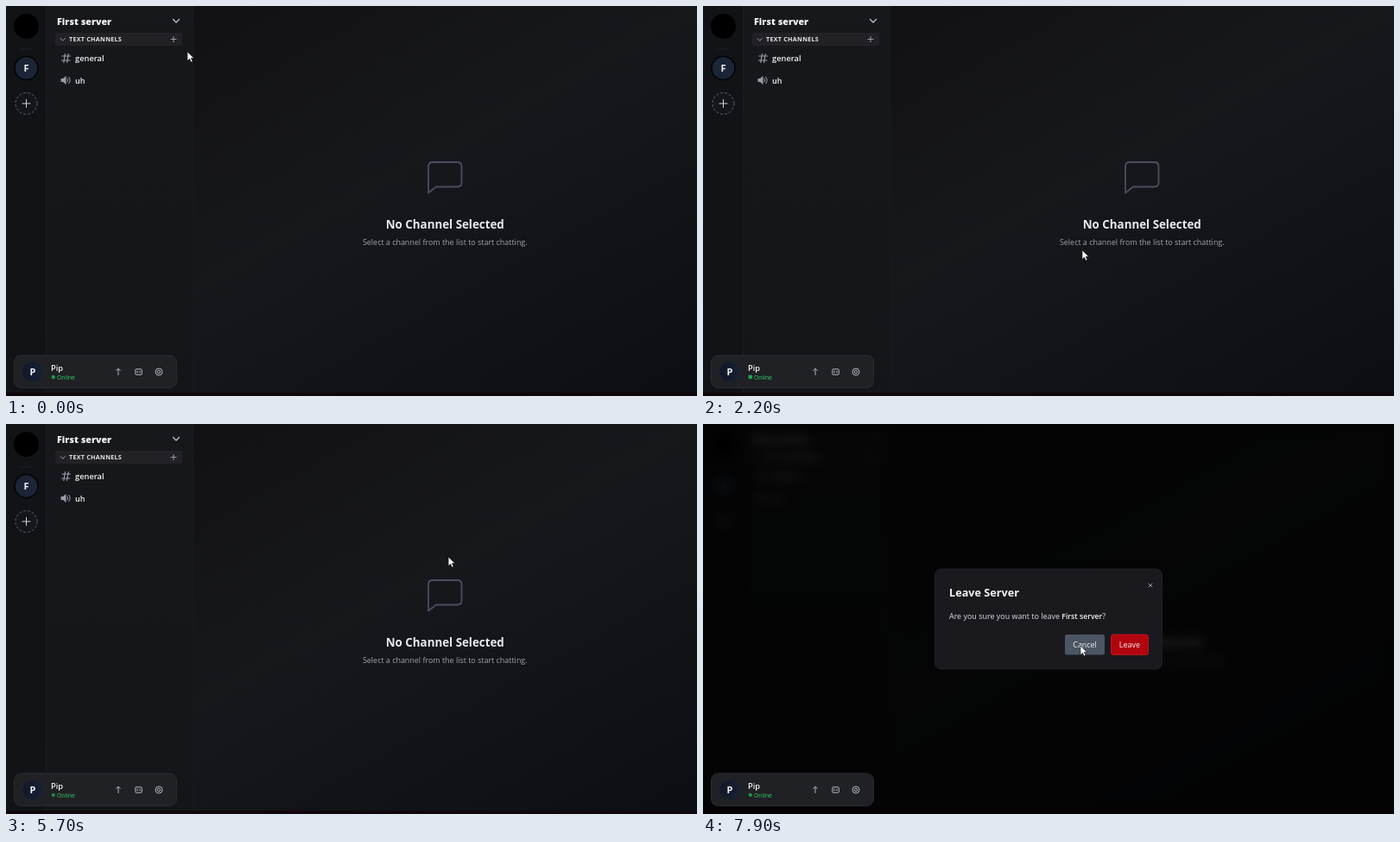
Animation, 800 px wide and 452 px high, one loop 8 s. Source, as an HTML page:

```html
<!DOCTYPE html>
<html lang="en">
<head>
<meta charset="utf-8">
<title>Server menu</title>
<style>
  html, body { margin: 0; width: 100%; height: 100%; overflow: hidden; background: #030304; }
  svg { display: block; width: 800px; height: 452px; font-family: "Open Sans", "Noto Sans", sans-serif; }
  .dim { filter: blur(6px) brightness(.2); }
  .line { fill: none; stroke-linecap: round; stroke-linejoin: round; }
</style>
</head>
<body>
<svg id="stage" viewBox="0 0 800 452"></svg>
<script>
const WHITE = '#f4f4f6', GREY = '#9a9ca6', SLATE = '#374151', HOVER = '#4b5563';
const stage = document.getElementById('stage');

// Text is placed by the vertical centre of its capitals.
const text = (x, cy, size, weight, fill, str, extra = '') =>
  `<text x="${x}" y="${cy + size * .36}" font-size="${size}" font-weight="${weight}" fill="${fill}" ${extra}>${str}</text>`;
const MID = 'text-anchor="middle"';
const box = (x, y, w, h, r, fill, extra = '') =>
  `<rect x="${x}" y="${y}" width="${w}" height="${h}" rx="${r}" fill="${fill}" ${extra}/>`;
const line = (d, stroke, width = 1, extra = '') =>
  `<path class="line" d="${d}" stroke="${stroke}" stroke-width="${width}" ${extra}/>`;
const disc = (x, y, r, fill, extra = '') =>
  `<circle cx="${x}" cy="${y}" r="${r}" fill="${fill}" ${extra}/>`;
const button = (x, y, w, h, fill, size, weight, label, extra = '') =>
  box(x, y, w, h, 2.5, fill, extra) + text(x + w / 2, y + h / 2, size, weight, WHITE, label, MID);
const avatar = (x, y, size) =>
  disc(x, y, 11.5, 'url(#avatar)') + text(x, y, size, 700, WHITE, 'P', MID);
const modal = (id, y, h, title, size, body) =>
  `<g id="${id}">` + box(268.5, y, 263, h, 7, '#19191e', 'stroke="#202026"') +
  text(285, y + 27.5, size, 700, WHITE, title) +
  line(`M516 ${y + 17}l4 4m0-4l-4 4`, '#a6a8b0', .9) + body + '</g>';

const rail = disc(23.5, 23.5, 14.5, '#000') +
  line('M17 50H30', '#1a2030') +
  disc(23.5, 72, 13.5, '#1c2536', 'stroke="#030408" stroke-width="1.5"') +
  text(23.5, 72, 11.2, 700, WHITE, 'F', MID) +
  disc(23.5, 113, 12.5, '#15161a', 'stroke="#5d606a" stroke-dasharray="3 2"') +
  line('M19 113h9M23.5 108.5v9', '#d0d2d8');

const channels = text(59, 18.2, 10.7, 800, WHITE, 'First server') +
  box(190, 10, 14, 14, 2, '#25262c', 'id="hover"') +
  '<g id="chevron">' + line('M193.5 15.5L197 19l3.5-3.5', '#c4c6cc', 1.2) + '</g>' +
  box(57, 31, 147, 15, 2, '#212126') +
  line('M63 37.5l2.7 2.7 2.7-2.7', GREY) +
  text(73, 38.5, 7.2, 700, '#e6e6ea', 'TEXT CHANNELS', 'letter-spacing=".25"') +
  line('M191 38.5h6M194 35.5v6', GREY) +
  line('M65 58h9.5M64.5 63h9.5M68.5 55.5l-1.7 10M72.3 55.5l-1.7 10', GREY, 1.2) +
  text(80, 60.5, 9.3, 600, WHITE, 'general') +
  `<path d="M63.5 84h2.500l3.500-3v10l-3.500-3h-2.500z" fill="${GREY}"/>` +
  line('M71 84q1.6 2 0 4M72.700 82.300q3.200 3.700 0 7.400', GREY) +
  text(80, 86.5, 9, 600, WHITE, 'uh');

const empty = line('M489 216.500V186q0-5 5-5H522.500q5 0 5 5V204.500q0 5-5 5H498z', '#4b4d5f', 1.8) +
  text(508.3, 253, 13.35, 700, '#e8e9ee', 'No Channel Selected', MID) +
  text(508.3, 273.3, 8.95, 400, '#a0a2ad', 'Select a channel from the list to start chatting.', MID);

const menu = '<g id="menu">' + box(100, 30, 104, 96.5, 2, '#1f1f27') +
  text(110, 42.7, 9, 600, WHITE, 'Server Settings') +
  text(110.5, 67, 9, 600, WHITE, '+ Create Category') +
  disc(114, 89, 1.5, WHITE) + disc(117.3, 89, 1.3, WHITE) +
  `<path d="M111 94q0-3 3-3t3 3zM117.500 94q0-2-.8-2.800 2.800-.3 2.800 2.800z" fill="${WHITE}"/>` +
  text(129, 91, 9, 600, '#3bd16f', 'Invite') +
  line('M112 117.500h7M113 117v-6h2.200v6M115.200 111.500h2.600v6', WHITE) +
  text(129, 114.7, 9, 600, '#f0435f', 'Leave Server') + '</g>';

const panel = '<g id="panel">' + box(9.5, 405, 188, 37.5, 8, '#202125', 'stroke="#2a2b30"') +
  avatar(31, 424, 11) + text(52, 419.7, 9.3, 600, WHITE, 'Pip') +
  disc(54.8, 430, 2.5, '#22c55e', 'id="status"') +
  text(59, 430.3, 6.8, 400, '#2fd268', 'Online') +
  line('M130 427.500v-7M127.700 422.500l2.300-2.300 2.300 2.300', '#b4b6be') +
  box(149.8, 420.8, 7.5, 6.5, 1, 'none', 'stroke="#b4b6be"') +
  line('M152 423v2M155 423v2', '#b4b6be') +
  disc(177, 424, 4, 'none', 'stroke="#b4b6be"') + disc(177, 424, 1.7, 'none', 'stroke="#b4b6be"') + '</g>';

const category = modal('category', 148.5, 155, 'Create Category', 12.8,
  text(285, 203.3, 9, 600, WHITE, 'Category Name') +
  box(285, 215, 230, 24.5, 3, '#222228') +
  text(293, 227.5, 8.9, 400, '#92949d', 'Enter category name') +
  text(285, 247, 6.7, 400, '#7d7f89', '0/20') +
  button(416, 263, 46, 24, SLATE, 8.9, 400, 'Cancel', 'class="cancel"') +
  button(469, 263, 46, 24, '#441dd3', 8.9, 400, 'Create'));

const invite = modal('invite', 132.5, 187, 'Invite Friends', 12.5,
  box(285.5, 180, 229.5, 39, 4, '#212127') + avatar(307, 199.7, 9) +
  text(326, 200, 9.2, 600, WHITE, 'palefern') +
  button(465, 191, 40, 17, '#10bb40', 7.7, 600, 'Invite') +
  box(285.5, 233.5, 229.5, 68.5, 4, '#212127') +
  text(295, 248.5, 7.73, 600, '#e4e5ea', 'Or, Send A Server Invite Link To A Friend') +
  box(295, 260, 167.5, 21, 2.5, '#17171c') +
  text(302.5, 270.5, 7.9, 400, WHITE, 'https://xelyra.gg/invite/f921a270-e233-49') +
  button(466.5, 260, 39.5, 21, '#4d25e6', 8.2, 600, 'Copy') +
  text(295, 289, 6.62, 400, '#9698a4', 'Your invite link expires in 7 days.'));

const leave = modal('leave', 168, 116, 'Leave Server', 12.7,
  text(285, 223, 8.95, 400, '#dcdde2',
    `Are you sure you want to leave <tspan font-weight="600" font-size="8.7" fill="${WHITE}">First server</tspan>?`) +
  button(419, 244, 46, 23.5, SLATE, 8.9, 400, 'Cancel', 'class="cancel"') +
  button(472.5, 244, 43, 23.5, '#b2040e', 9, 400, 'Leave', 'stroke="#cf1722" stroke-width=".8"'));

stage.innerHTML = `<defs>
  <linearGradient id="main" x1="0" y1="0" x2="1" y2="1">
    <stop stop-color="#0f0f10"/><stop offset=".5" stop-color="#17181c"/><stop offset="1" stop-color="#0d0e13"/>
  </linearGradient>
  <linearGradient id="side" x2="0" y2="1">
    <stop stop-color="#17181c"/><stop offset="1" stop-color="#141519"/>
  </linearGradient>
  <linearGradient id="avatar"><stop stop-color="#111827"/><stop offset="1" stop-color="#172036"/></linearGradient>
</defs>
<g id="app">` +
  box(0, 0, 800, 448, 0, 'url(#main)') + box(0, 0, 47, 448, 0, '#121317') +
  box(47, 0, 170, 448, 0, 'url(#side)') +
  line('M46.5 0V448', '#1d1e22') + line('M217 0V448', '#191a1e') +
  rail + channels + empty + menu + '</g>' +
  panel + category + invite + leave + box(0, 448, 800, 4, 0, '', 'id="edge"') +
  `<path id="cursor" d="M0 0v10.500l2.500-2.300 1.700 3.800 1.800-.8-1.700-3.700h3.300z" fill="#fff" stroke="#111" stroke-width=".6"/>`;

const $ = id => document.getElementById(id);
const show = (id, on) => $(id).style.display = on ? '' : 'none';
const cancels = [...document.querySelectorAll('.cancel')];

// Pointer stops: time, x, y
const stops = [
  [0, 210, 53], [300, 197, 18], [600, 197, 18], [1000, 168, 67], [1400, 168, 67],
  [1900, 439, 283], [2550, 439, 283], [3200, 197, 19], [3450, 197, 19],
  [3900, 165, 95], [4250, 165, 95], [4700, 457, 257], [5000, 457, 257],
  [5400, 517, 158], [5650, 517, 156], [6350, 196, 21], [6600, 196, 21],
  [7000, 157, 114], [7350, 157, 114], [7800, 437, 257], [8000, 437, 257]
];

function pointer(t) {
  const i = stops.findIndex(s => s[0] > t);
  const [a, b] = [stops[i - 1], stops[i]];
  const p = (t - a[0]) / (b[0] - a[0]), e = p * p * (3 - 2 * p);
  return [a[1] + (b[1] - a[1]) * e, a[2] + (b[2] - a[2]) * e];
}

// Each visit: menu opens, a dialog replaces it, the dialog closes.
const visits = [
  ['category', 500, 1250, 2150],
  ['invite', 3350, 4250, 5650],
  ['leave', 6550, 7300, 8000]
];

const within = (v, a, b) => v >= a && v < b;

function draw(now) {
  const t = now % 8000;
  const [x, y] = pointer(t);
  let open = false, dialog = '';
  for (const [id, menuAt, dialogAt, closeAt] of visits) {
    const on = within(t, dialogAt, closeAt);
    show(id, on);
    if (on) dialog = id;
    if (within(t, menuAt, dialogAt)) open = true;
  }

  show('menu', open);
  show('hover', !dialog && within(x, 190, 204) && within(y, 10, 24));
  $('chevron').setAttribute('transform', open ? 'rotate(180 197 17.2)' : '');
  $('app').setAttribute('class', dialog ? 'dim' : '');
  $('panel').setAttribute('class', dialog === 'category' ? 'dim' : '');
  $('edge').setAttribute('fill', dialog ? '#060203' : '#10070d');

  const overCancel = within(x, 416, 465) && within(y, 244, 287);
  for (const c of cancels) c.setAttribute('fill', overCancel ? HOVER : SLATE);

  const pulse = .5 + .5 * Math.cos((t - 700) * Math.PI / 1000);
  $('status').setAttribute('r', 2.1 + .6 * pulse);
  $('status').setAttribute('opacity', .65 + .35 * pulse);
  $('cursor').setAttribute('transform', `translate(${x} ${y})`);
}

const start = performance.now();
function frame() {
  draw(performance.now() - start);
  requestAnimationFrame(frame);
}
frame();
</script>
</body>
</html>
```
